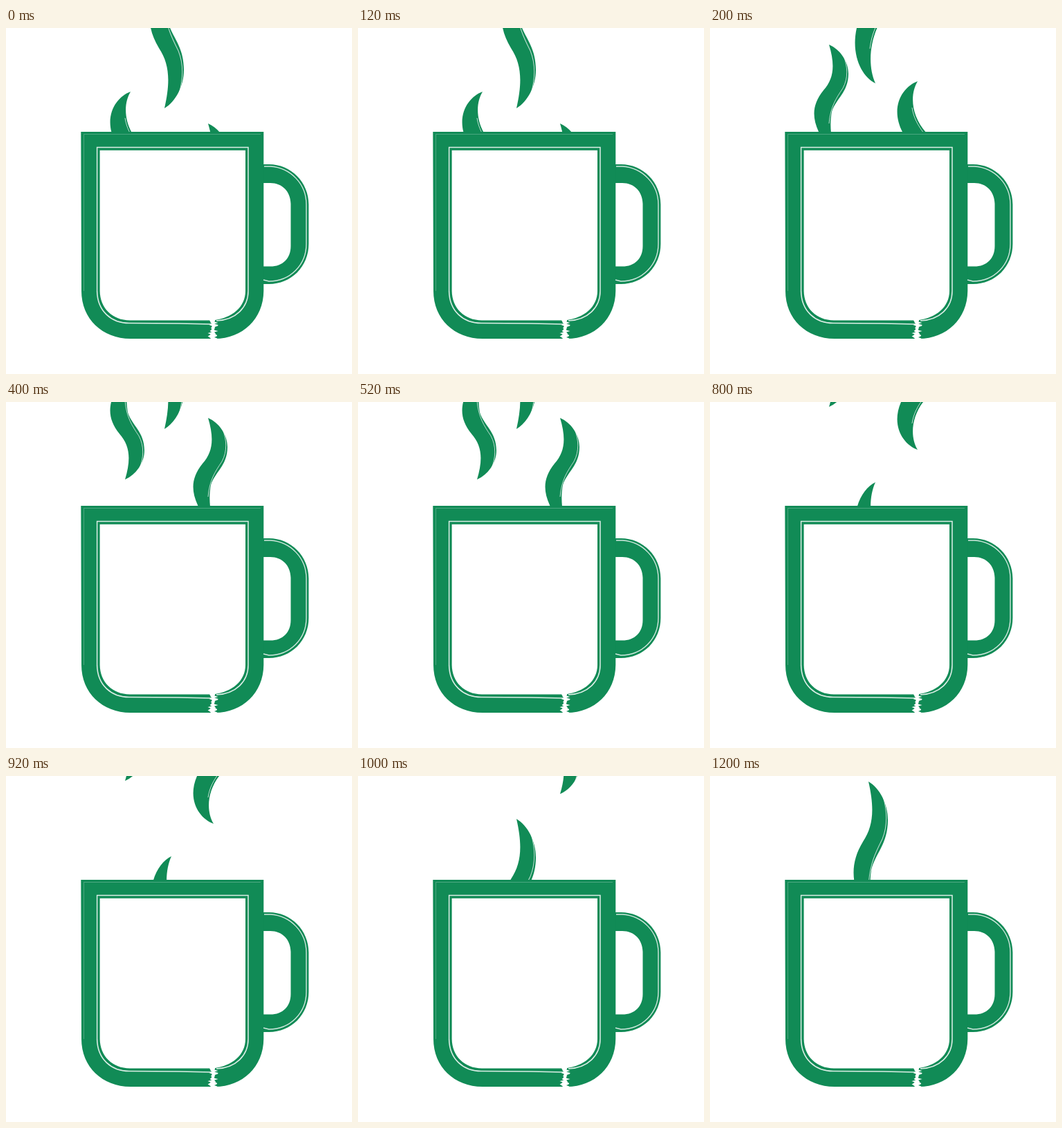
These frames come from a looping animation (500x500 px, 1.4 s). An HTML page with a canvas:

```html
<!DOCTYPE html>
<html lang="en">
<head>
<meta charset="utf-8">
<title>Steaming mug</title>
<style>
  html, body { margin: 0; width: 100%; height: 100%; overflow: hidden; background: #fff; }
  canvas { display: block; width: 100vw; height: 100vh; }
</style>
</head>
<body>
<canvas id="stage" width="500" height="500"></canvas>
<script>
const ctx = document.getElementById('stage').getContext('2d');
const GREEN = '#118b56';
const STEP = 200;
const STEPS = 7;
const RIM = 151;

// Steam wisps, drawn downwards from a tip at 0,0
const wave = {
  body: new Path2D('M0 0 C16 7 28 24 28 42 C28 69 10 78 4 97 C2 108 2 118 3 128 L6 140 L-9 140 L-15 126 C-25 104 -24 86 -8 66 C7 49 9 30 0 0Z'),
  streak: new Path2D('M21 16 C27 32 28 48 20 63 C10 78 2 90 0 114')
};
const horn = {
  body: new Path2D('M0 0 C-22 8 -41 38 -21 75 L14 76 C-9 52 -12 20 0 0Z'),
  streak: new Path2D('M-8 38 C-6 52 0 63 9 75')
};

const UP = 1, DOWN = -1;
const wisps = [
  { x: 172, lean: 8, stretch: 1, poses: [
    [horn, 92, UP], [wave, 24, UP], [wave, 112, DOWN], [horn, 72, DOWN], [wave, 7, DOWN]] },
  { x: 229, lean: 10, stretch: 1.32, poses: [
    [wave, 116, DOWN], [horn, 80, DOWN], [wave, 39, DOWN], null,
    [horn, 116, UP], [wave, 62, UP], [wave, 8, UP]] },
  { x: 292, lean: 8, stretch: 1, poses: [
    [wave, 138, UP], [horn, 77, UP], [wave, 23, UP], [wave, 132, DOWN],
    [horn, 69, DOWN], [wave, 26, DOWN]] }
];

const mug = new Path2D(
  'M108.3 150 H372.3 V380 C372 420 342 449 302 449 H180 C139 449 109 420 109 380Z' +
  'M135.6 176.7 V380 C136 405 154 422.4 179 422.4 H300 C327 419 346 403 346 380 V176.7Z');
const handle = new Path2D(
  'M371 197 H380 C412 197 437.4 223 437.4 255 V312 C437.4 345 412 370 380 370 H371Z' +
  'M371 224 V344.6 H382 C400 344.6 411.5 333 411.5 315 V254 C411 236 399 224 382 224Z');
const innerLine = new Path2D('M131.6 380 V172.5 H350 V380 C350 404 332 422 304 423');
const baseLine = new Path2D('M131.6 380 C132 409 152 426.5 178 426.5 L250 427 L297 428');
const handleLine = new Path2D('M373 200 H382 C412 202 434 226 434 255 V312 C434 342 411 366 380 366 L372 364');
const edgeLine = new Path2D('M112.5 380 V153.5 H368');

function noise(n) {
  const v = Math.sin(n * 12.9898) * 43758.5453;
  return v - Math.floor(v);
}

function line(path, width, alpha) {
  ctx.strokeStyle = `rgba(255,255,255,${alpha})`;
  ctx.lineWidth = width;
  ctx.stroke(path);
}

function drawWisp({ x, lean, stretch, poses }, step) {
  if (!poses[step]) return;
  const [shape, tip, dir] = poses[step];
  ctx.save();
  ctx.translate(shape === horn ? x + lean : x, tip);
  ctx.scale(1, dir * stretch);
  ctx.fillStyle = GREEN;
  ctx.fill(shape.body);
  line(shape.streak, 1, 0.7);
  ctx.restore();
}

// Ragged gap where the brush stroke ends meet
function drawGap() {
  ctx.fillStyle = '#fff';
  ctx.beginPath();
  ctx.moveTo(298, 420);
  for (let y = 420; y <= 450; y += 1.5) ctx.lineTo(297.5 - 8 * noise(y) ** 3, y);
  for (let y = 450; y >= 420; y -= 1.5) ctx.lineTo(301 + 6 * noise(y + 70) ** 3, y);
  ctx.fill();
}

function drawMug() {
  ctx.fillStyle = GREEN;
  ctx.fill(handle, 'evenodd');
  ctx.fill(mug, 'evenodd');
  line(innerLine, 1.5, 0.85);
  line(baseLine, 1.6, 0.85);
  line(handleLine, 1.4, 0.8);
  line(edgeLine, 0.8, 0.3);
  drawGap();
}

function draw(now) {
  const step = Math.floor(now / STEP) % STEPS;
  ctx.fillStyle = '#fff';
  ctx.fillRect(0, 0, 500, 500);
  ctx.save();
  ctx.beginPath();
  ctx.rect(0, 0, 500, RIM);
  ctx.clip();
  wisps.forEach(w => drawWisp(w, step));
  ctx.restore();
  drawMug();
}

const start = performance.now();
function tick() {
  draw(performance.now() - start);
  requestAnimationFrame(tick);
}
tick();
</script>
</body>
</html>
```
